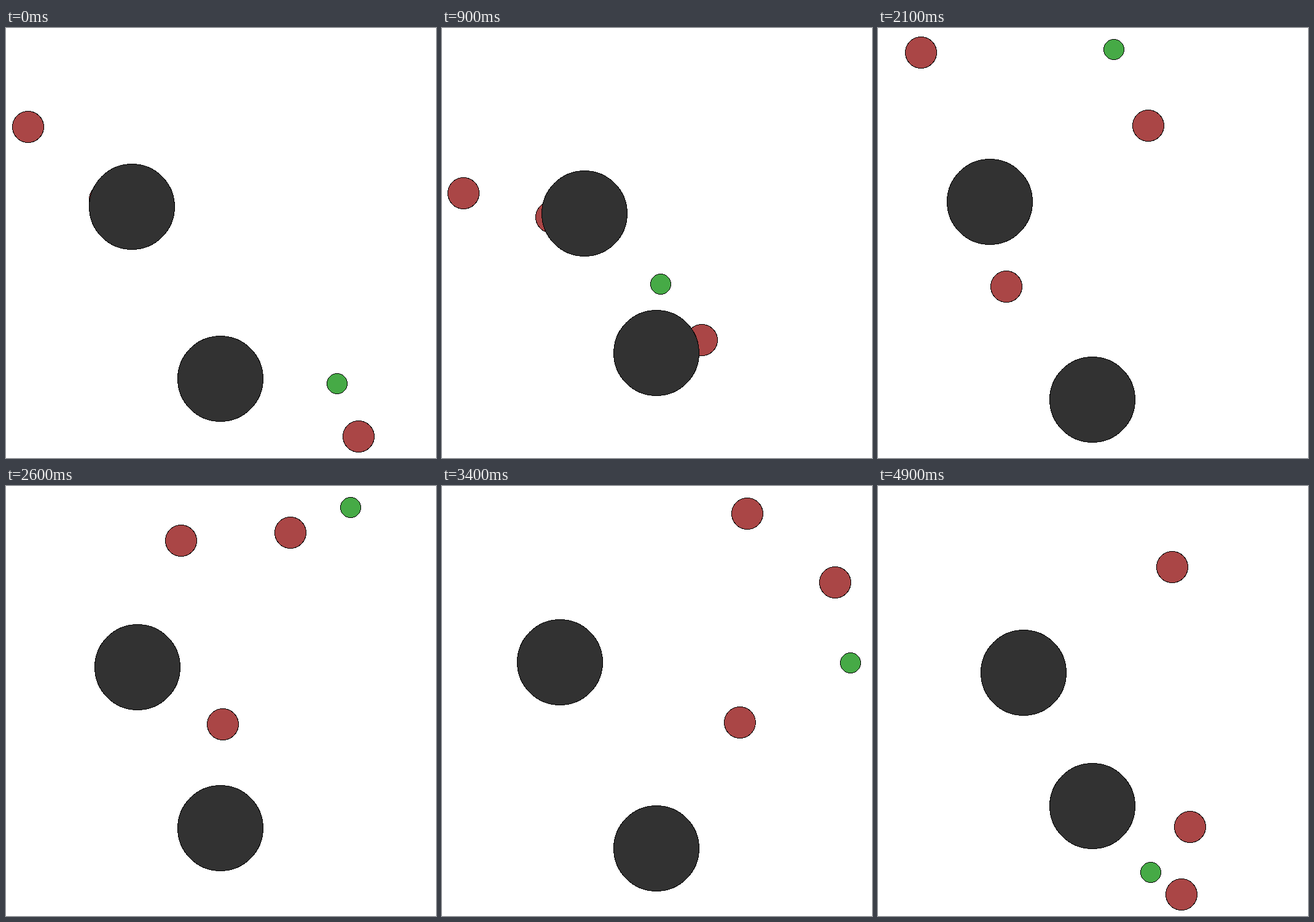
Recreate the animation shown at these times as an HTML page. Size 700 by 700 pixels, loop 5000 ms.

```html
<!DOCTYPE html>
<html lang="en">
<head>
<meta charset="utf-8">
<title>Chase</title>
<style>
  html, body { margin: 0; width: 100%; height: 100%; overflow: hidden; background: #fff; }
  svg { display: block; width: 100vw; height: 100vh; }
  circle { stroke: #000; stroke-width: 1; shape-rendering: crispEdges; }
</style>
</head>
<body>
<svg id="stage" viewBox="0 0 700 700"></svg>
<script>
const STEP = 100, STEPS = 50, MID = 350, REACH = 315;
const RED = '#aa4646', GREEN = '#46aa46', DARK = '#323232';

// Turning points shared by all agents; places are measured from the centre.
const turns = [0, 9, 17, 21, 26, 29, 34, 41, 49];
const bodies = [
  { r: 26, fill: RED, path: [[-314, -189], [-388.7, -99], [-362.6, -247], [-242, -268],
    [-69, -278], [10, -281], [136, -280], [163, -280], [166, -280]] },
  { r: 26, fill: RED, path: [[-189, -71], [-212, -51], [-227, 62], [-122, 62],
    [4, 41], [75, -2], [125, 33], [136.5, 254.5], [186, 405]] },
  { r: 26, fill: RED, path: [[224, 315], [91, 196], [44, -54], [78, -165],
    [121, -292], [180, -306], [267.5, -177], [281.85, 59.5], [204, 264]] },
  { r: 17, fill: GREEN, path: [[189, 229], [8, 83], [-26, -218], [30, -273],
    [226, -336.25], [289, -265], [290.1, -57], [255.5, 202], [121, 359]] },
  { r: 70, fill: DARK, rock: [-144.9, -58.01] },
  { r: 70, fill: DARK, rock: [-0.5, 221.05] }
];

const stage = document.getElementById('stage');
for (const b of bodies) {
  b.el = document.createElementNS('http://www.w3.org/2000/svg', 'circle');
  b.el.setAttribute('r', b.r - 0.5);
  b.el.setAttribute('fill', b.fill);
  stage.append(b.el);
}

// Speed at a turn: at rest at the start, the slope between neighbours elsewhere.
function speed(path, i, axis) {
  if (i === 0) return 0;
  const next = Math.min(i + 1, turns.length - 1);
  return (path[next][axis] - path[i - 1][axis]) / (turns[next] - turns[i - 1]);
}

// Smooth cubic through the turns.
function locate(path, t) {
  const i = turns.findIndex((k, n) => n === turns.length - 2 || t < turns[n + 1]);
  const h = turns[i + 1] - turns[i], u = (t - turns[i]) / h, v = 1 - u;
  return [0, 1].map(k =>
    path[i][k] * v * v * (1 + 2 * u) + path[i + 1][k] * u * u * (3 - 2 * u) +
    h * u * v * (v * speed(path, i, k) - u * speed(path, i + 1, k)));
}

// The view zooms so that the farthest agent always sits at the same reach.
function draw(step) {
  const spots = bodies.map(b => b.rock || locate(b.path, step));
  const far = spots.filter((s, i) => bodies[i].path).flat().map(Math.abs);
  const zoom = REACH / Math.max(...far);
  bodies.forEach((b, i) => {
    const [x, y] = spots[i].map(p => Math.floor(MID + p * zoom + 1e-6));
    b.el.setAttribute('cx', x);
    b.el.setAttribute('cy', y);
  });
}

const start = performance.now();
function tick() {
  draw(Math.floor((performance.now() - start) / STEP) % STEPS);
  requestAnimationFrame(tick);
}
tick();
</script>
</body>
</html>
```
